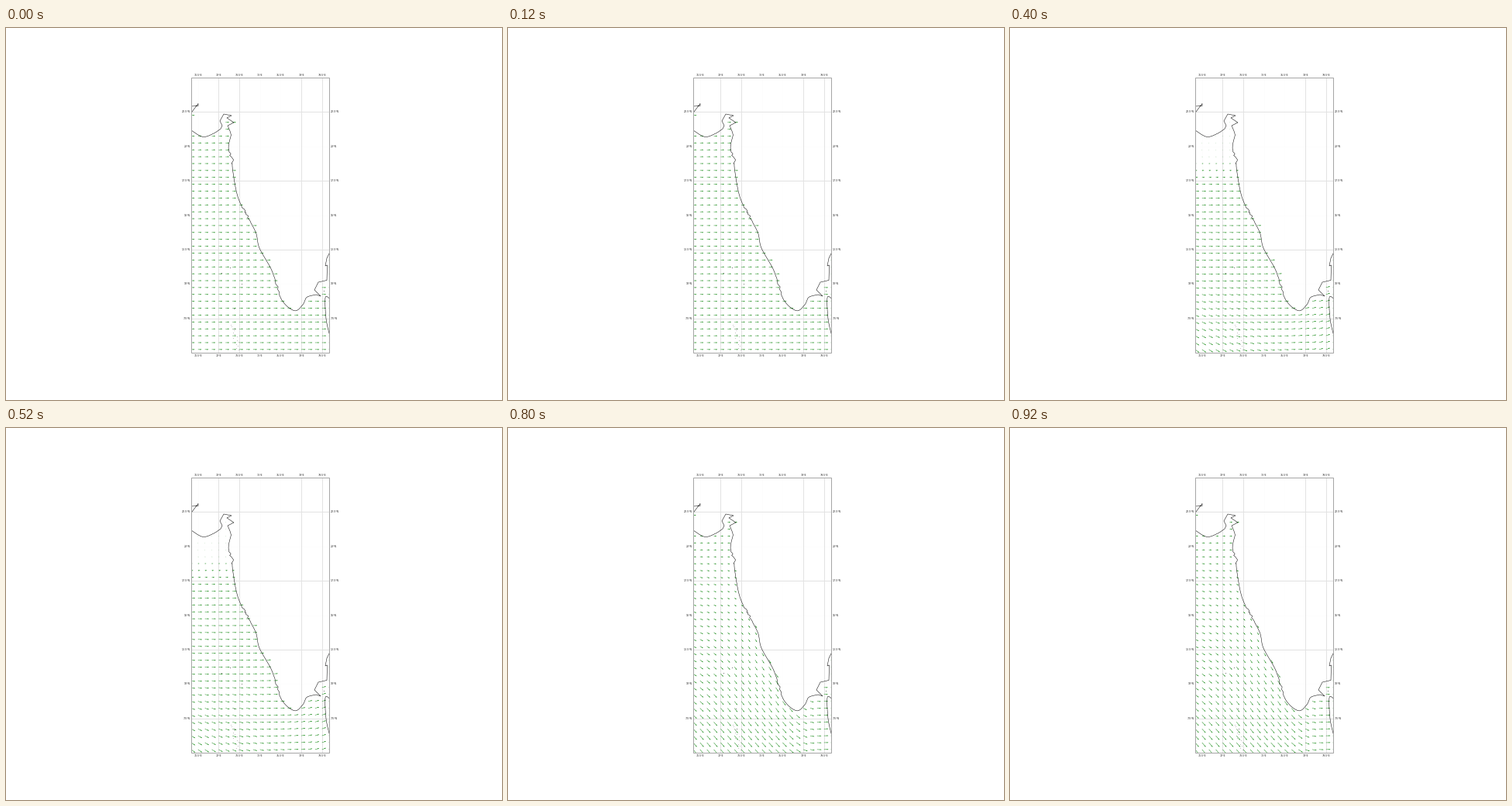
Recreate the animation shown at these times as a matplotlib script. Size 640x480 px, loop 1 s.

```python
import numpy as np
import matplotlib.pyplot as plt
from matplotlib.animation import FuncAnimation
from matplotlib.patches import Rectangle
from matplotlib.path import Path

W, H, DPI = 640, 480, 100
PT = 72 / DPI                       # points per pixel
LEFT, TOP, DEG = 238.9, 63.9, 17.77  # map corner and pixels per degree
WIDTH, HEIGHT = 10 * DEG, 20 * DEG
RIGHT, BOTTOM = LEFT + WIDTH, TOP + HEIGHT
rng = np.random.default_rng(4)


def lon_x(lon):
    return LEFT + (lon - 70) * DEG


def lat_y(lat):
    return TOP + (25 - lat) * DEG


def smooth(*points, steps=12):
    """Catmull-Rom curve through the points."""
    p = np.array([points[0], *points, points[-1]], float)
    t = np.linspace(0, 1, steps)[:, None]
    return np.vstack([
        b + t * (c - a) / 2 + t**2 * (a - 2.5 * b + 2 * c - d / 2)
        + t**3 * (1.5 * (b - c) + (d - a) / 2)
        for a, b, c, d in zip(p, p[1:], p[2:], p[3:])])


def add_creeks(coast):
    """Ragged inlets around a few latitudes."""
    ragged = coast.copy()
    for y, spread, depth in ((169, 8, 4), (239, 9, 3), (334, 8, 3)):
        reach = depth * np.exp(-((coast[:, 1] - y) / spread) ** 2)
        ragged[:, 0] += reach * rng.uniform(-.2, 1, len(coast))
    return ragged


gulf_shore = np.vstack([
    smooth((239, 132), (254, 140.4), (268, 136), (277, 130)),
    [(279, 126), (276, 120), (281, 111), (291, 113), (285, 116), (294, 122),
     (286, 126), (289, 133)]])
main_shore = smooth(
    (290.5, 138), (287, 155), (291, 175), (298, 214), (308, 238), (322, 263),
    (327, 284), (343, 313), (355, 349.5), (372, 364.7), (383, 357), (388, 347.5), (400, 344))
strait_shore = [(406, 346), (398, 338), (403, 328), (414, 325.5), (414.5, 306),
                (412, 307), (414, 297), (417.5, 290)]
island = smooth((417.5, 349), (412, 348), (413, 375), (417.5, 396))
inlet = [(239, 101), (248, 100.5), (248, 97.5), (239, 109.5)]
shores = [np.vstack([gulf_shore, add_creeks(main_shore), strait_shore]), island, inlet]
land = Path(np.vstack([[(230, 132)], gulf_shore, main_shore, strait_shore,
                       [(417.5, 64), (230, 64)]]))


def steady(s, e):
    return 4.7 + e * s, 0 * s


def monsoon(s, e):
    dip = 7 * e * (1.3 - e) * np.sin(np.pi * s)
    return 8 - 7 * s**3 * (1 - e) - 3 * s * e - dip, 9.5 - 5 * s**2 - dip


def calm_north(s, e):
    strength = np.clip(6 * (s - .15), 0, 1)
    return 5.4 * strength, strength * (2.5 * e**2 * s - 4 * s**4 * (1 - e))


def sea_breeze(s, e):
    u = 7 - 1.5 * e - 3.5 * s**2 * (1 - e)
    return u, (1.5 + 2.5 * np.sin(np.pi * s)) * (1 - e) ** 2 + 2 * e**3


def southward(s, e):
    west_side = (1 - np.tanh(10 * (e - .78))) / 2
    u = 4 + s + e * s - 9 * e * (1 - e) * np.sin(np.pi * s)
    return u, .3 - 6.3 * s**1.5 * (1 + 3 * e * (1 - s)) * west_side


WINDS = [steady, monsoon, calm_north, sea_breeze, southward]

lons, lats = np.meshgrid(np.arange(70, 80.1, .5), np.arange(5.25, 22.5, .5))
tail_x, tail_y = lon_x(lons).ravel(), lat_y(lats).ravel()
on_land = land.contains_points(np.column_stack([tail_x - 1.2, tail_y]))
in_inlet = (tail_y < 117) & (tail_x < 245)
at_sea = in_inlet | ~on_land & (tail_y > 117)
tail_x, tail_y = tail_x[at_sea], tail_y[at_sea]
south = (tail_y - tail_y.min()) / np.ptp(tail_y)
east = (tail_x - LEFT) / WIDTH

fig = plt.figure(figsize=(W / DPI, H / DPI), dpi=DPI, facecolor="white")
ax = fig.add_axes([0, 0, 1, 1])
ax.set(xlim=(0, W), ylim=(H, 0))
ax.axis("off")
frame = Rectangle((LEFT, TOP), WIDTH, HEIGHT, fill=False, ec="#a6a6a6", lw=PT, zorder=5)
ax.add_patch(frame)


def label(x, y, text, ha="center"):
    ax.text(x, y, text, fontsize=3.15 * PT, family="DejaVu Sans", color="#222222",
            ha=ha, va="center")


def grid_line(xs, ys, strong):
    ax.plot(xs, ys, color="#e2e2e2" if strong else "#fdfdfd", lw=PT, zorder=2 if strong else 1)


for lon in np.arange(70.5, 80, 1.5):
    x = lon_x(lon)
    grid_line([x, x], [TOP, BOTTOM], lon in (72, 73.5, 78, 79.5))
    for y in (TOP - 3.2, BOTTOM + 3.4):
        label(x, y, f"{lon:g}°E")
for lat in np.arange(7.5, 23, 2.5):
    y = lat_y(lat)
    grid_line([LEFT, RIGHT], [y, y], lat % 5 != 0)
    label(LEFT - 1.4, y, f"{lat:g}°N", ha="right")
    label(RIGHT + 1.8, y, f"{lat:g}°N", ha="left")

for shore in shores:
    line, = ax.plot(*np.array(shore).T, color="black", lw=.5 * PT, zorder=4)
    line.set_clip_path(frame)

# Scattered islets and a southern chain of atolls
chain = np.linspace(0, 1, 14)
ax.scatter(291 + 9 * chain + rng.normal(0, 1.5, 14), 383 + 32 * chain,
           s=.6, color="#bbbbbb", lw=0, zorder=4)
ax.scatter([278, 288.5, 293.5, 304, 410, 295], [316, 309, 362, 330, 339, 388],
           s=.6, color="#666666", lw=0, zorder=4)

arrows = ax.quiver(tail_x, tail_y, *steady(south, east), color="green", units="dots",
                   width=.45, scale_units="dots", scale=1, zorder=3)
arrows.set_clip_path(frame)


def update(step):
    arrows.set_UVC(*WINDS[step](south, east))
    return arrows,


anim = FuncAnimation(fig, update, frames=len(WINDS), interval=200, repeat=True, repeat_delay=0)
plt.show()
```
